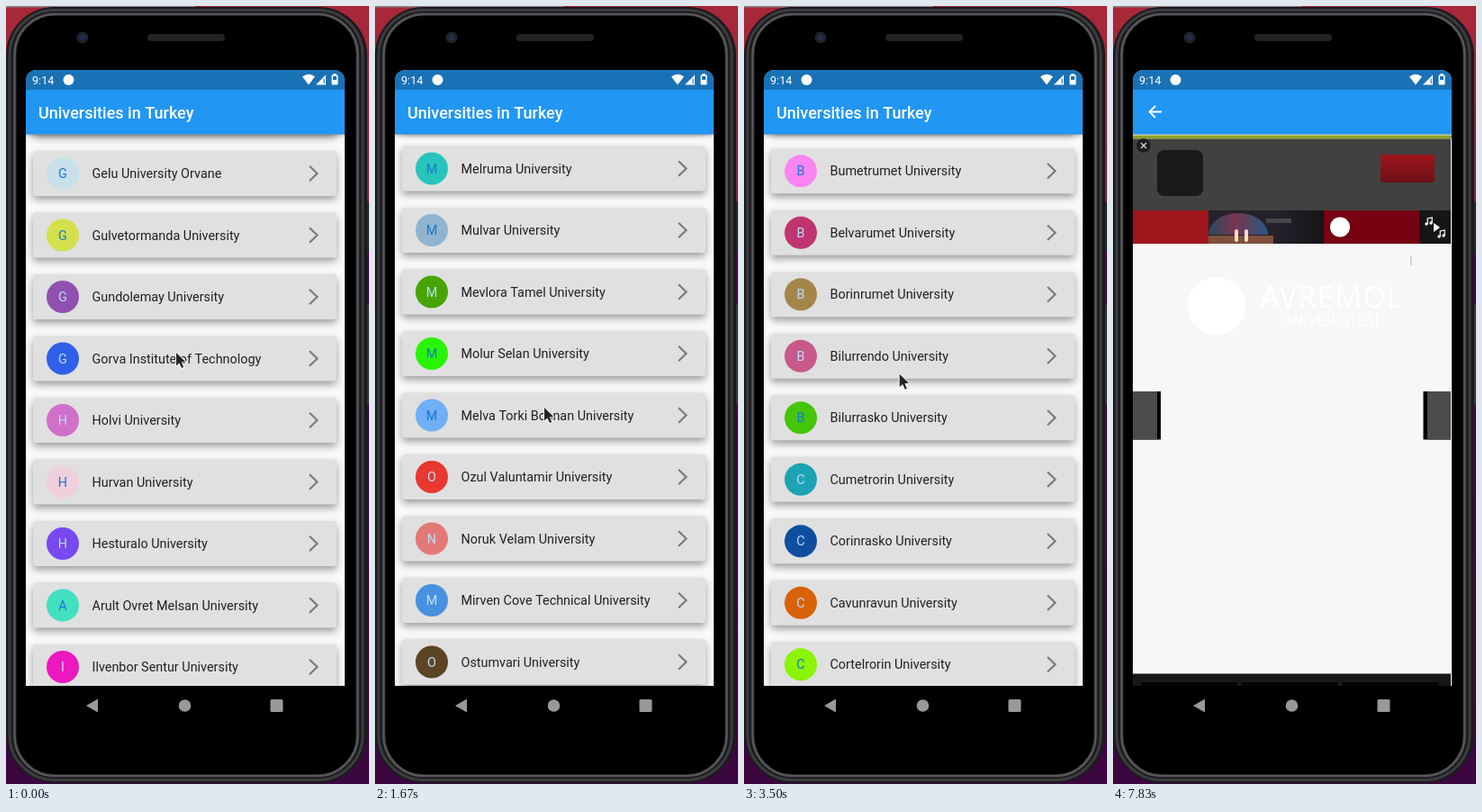
Write an HTML page with a canvas that moves like this. It is 403 px wide and 864 px high and loops after 8 s.

```html
<!DOCTYPE html>
<html lang="en">
<head>
<meta charset="utf-8">
<title>University list</title>
<style>
  html, body { margin: 0; width: 100%; height: 100%; overflow: hidden; background: #000; }
  canvas { display: block; }
</style>
</head>
<body>
<canvas id="stage" width="403" height="864"></canvas>
<script>
const ctx = document.getElementById('stage').getContext('2d');
const LOOP = 8000, PITCH = 68.5, FIRST_Y = 177;
const SANS = 'Roboto, sans-serif';
const SCREEN = { x: 22, y: 71, w: 354, h: 684 };

const rand = n => { const v = Math.sin(n * 12.9898 + 4.1) * 43758.5453; return v - Math.floor(v); };
const clamp = v => Math.max(0, Math.min(1, v));

// Each row: name | avatar colour | avatar colour once the row has been rebuilt
const parse = text => text.trim().split('\n').map(row => row.trim().split('|'));

const SYLLABLES = ['elva', 'orin', 'umet', 'asko', 'ilur', 'endo', 'avun', 'ortel'];
const filler = (initials, seed) => [...initials].map((letter, i) => {
  const pick = k => SYLLABLES[Math.floor(rand(seed + i * 3 + k) * SYLLABLES.length)];
  return [letter + pick(1) + 'r' + pick(2) + ' University'];
});

const rows = [
  ...parse(`
    Arvon Tundelas University||60f4ac
    Alu Ovrem University||80b040
    Alvoruz University||c8e4f0
    Astul Venorape University||f04828
    Avremol University||38c0a0
    Artuva University||4830cc
    Ilvenbor Utel University||f0fcb8
    Asvünt University||c08820
    Arlivo University||68f474`),
  ...filler('BBBBBBBCCCCCDDDDEEFF', 10),
  ...parse(`
    Gelu University Orvane|c8e0ea
    Gulvetormanda University|d4e04c
    Gundolemay University|9050b0
    Gorva Institute of Technology|3060e8
    Holvi University|d070c8
    Hurvan University|f0d0dc
    Hesturalo University|7848f0
    Arult Ovret Melsan University|40e0c0
    Ilvenbor Sentur University|ec18c0`),
  ...filler('II', 90),
  ...parse(`
    Ilvenbor Pelira University|004468
    Ilvenbor Technical University|b01c00
    Irlov Institute of Technology|e840f0
    Irlov Economic University|4888d8
    Kolvus University|001400
    Zervundal Tovelmir University|c02c00
    Kovel Tas University|70789c
    Kurel 5 Ormalı University|e81898
    Kovulmer University|b88c7c
    Nolvettur Ormasan University||706858
    Kuvelin University||e0e4b0
    Kelvoramentas Büldü Orem/University||18284c
    Kolumeniv Technical University||bc5884
    Köv University||10b444
    Molvuna University||dc1c74
    Melruma University|28c4bc|38c090
    Mulvar University|90b4d0|90901c
    Mevlora Tamel University|48a400|f44820
    Molur Selan University|28f400
    Melva Torki Bosnan University|70b0f8
    Ozul Valuntamir University|e83830
    Noruk Velam University|e47878
    Mirven Cove Technical University|4890e0
    Ostumvari University|5c4424`),
  ...filler('PSSSSTTTUUYY', 140)
];
const LAST_REBUILT = 57, TURN = 2200;

// Keyframes: time, value...
const SCROLL = [[0, 1977.5], [830, 2728], [1250, 3080], [1670, 3764], [TURN, 4255],
  [2500, 4010], [2830, 3386.5], [3250, 1950], [3750, 0], [LOOP, 0]];
const CURSOR = [[0, 189, 385], [900, 189, 385], [1250, 190, 490], [1670, 188, 446],
  [1950, 188, 400], [2250, 187, 400], [2830, 175, 677], [3250, 174, 560], [3900, 171, 207],
  [4640, 171, 207], [4970, 150, 458], [6700, 150, 458], [7530, 31, 440], [7650, -20, 436], [LOOP, -20, 436]];
const GLOW = [[0, 0], [3700, 0], [3820, 48], [4130, 8], [4360, 8], [4370, 0], [LOOP, 0]];

// Monotone cubic interpolation
function track(keys, t, col = 1) {
  const k = Math.max(0, keys.findIndex(key => key[0] > t) - 1);
  const slope = i => i < 0 || i > keys.length - 2 ? 0
    : (keys[i + 1][col] - keys[i][col]) / (keys[i + 1][0] - keys[i][0]);
  const tangent = i => {
    const a = slope(i - 1), b = slope(i);
    if (i === 0) return b;
    return a * b <= 0 ? 0 : 2 * a * b / (a + b);
  };
  const span = keys[k + 1][0] - keys[k][0], u = (t - keys[k][0]) / span;
  const from = keys[k][col], to = keys[k + 1][col];
  return from + (to - from) * u * u * (3 - 2 * u)
    + span * u * (1 - u) * ((1 - u) * tangent(k) - u * tangent(k + 1));
}

function rect(x, y, w, h, fill, radius = 0) {
  ctx.fillStyle = fill;
  ctx.beginPath();
  ctx.roundRect(x, y, w, h, radius);
  ctx.fill();
}
function outline(x, y, w, h, radius, color, width) {
  ctx.strokeStyle = color;
  ctx.lineWidth = width;
  ctx.beginPath();
  ctx.roundRect(x, y, w, h, radius);
  ctx.stroke();
}
function circle(x, y, r, fill) {
  ctx.fillStyle = fill;
  ctx.beginPath();
  ctx.arc(x, y, r, 0, Math.PI * 2);
  ctx.fill();
}
function poly(points, fill, stroke, width) {
  ctx.beginPath();
  points.forEach(([x, y]) => ctx.lineTo(x, y));
  if (fill) { ctx.closePath(); ctx.fillStyle = fill; ctx.fill(); }
  if (stroke) { ctx.strokeStyle = stroke; ctx.lineWidth = width; ctx.stroke(); }
}
function text(str, x, y, font, fill, align = 'left') {
  ctx.font = font;
  ctx.fillStyle = fill;
  ctx.textAlign = align;
  ctx.fillText(str, x, y);
}
function gradient(x0, y0, x1, y1, ...stops) {
  const g = ctx.createLinearGradient(x0, y0, x1, y1);
  stops.forEach(([at, color]) => g.addColorStop(at, color));
  return g;
}
function clipped(x, y, w, h, radius, draw) {
  ctx.save();
  ctx.beginPath();
  ctx.roundRect(x, y, w, h, radius);
  ctx.clip();
  draw();
  ctx.restore();
}
function shadow(color, blur, dy) {
  ctx.shadowColor = color;
  ctx.shadowBlur = blur;
  ctx.shadowOffsetY = dy;
}

function avatarColor(i, rebuilt) {
  const hex = rows[i][rebuilt ? 2 : 1];
  return [0, 1, 2].map(c => hex ? parseInt(hex.substr(c * 2, 2), 16)
    : Math.floor(256 * rand(i * 7 + c * 31 + (rebuilt ? 500 : 0))));
}
function isLight(rgb) {
  const [r, g, b] = rgb.map(v => ((v / 255 + 0.055) / 1.055) ** 2.4);
  return (0.2126 * r + 0.7152 * g + 0.0722 * b + 0.05) ** 2 > 0.15;
}

function drawPhone() {
  rect(0, 0, 403, 864, gradient(0, 0, 0, 864, [0, '#a82838'], [0.25, '#90243e'],
    [0.32, '#4c0650'], [1, '#3c0640']));
  rect(0, 0, 210, 1.5, '#8e8088');
  rect(399, 217, 4, 56, '#29292b', 1);
  rect(399, 331, 4, 112, '#3a393b', 1);
  rect(0, 1, 401, 862, '#1b1b1e', 54);
  outline(4, 4.5, 392, 855, 50, '#3c3c40', 3);
  outline(9.5, 9, 381, 846, 45, '#57575b', 2.5);
  rect(12, 11, 376, 842, '#000', 42);
  circle(85, 35, 6.5, '#20222b');
  circle(85, 35, 3.5, '#252b48');
  rect(157, 31, 86, 8, '#232325', 4);
  poly([[89, 777], [102, 769.5], [102, 784.5]], '#999');
  circle(198.5, 777, 6.8, '#999');
  rect(293.5, 770, 14, 14, '#999', 1.5);
}

function drawAppBar() {
  ctx.save();
  shadow('rgba(0,0,0,.3)', 4, 1);
  rect(22, 71, 354, 71.5, '#2196f3');
  ctx.restore();
}

function drawStatus() {
  rect(22, 71, 354, 22, 'rgba(0,0,0,.25)');
  text('9:14', 29, 86.5, '12.6px ' + SANS, '#fff');
  circle(69.5, 82, 6, '#fff');
  ctx.beginPath();
  ctx.moveTo(336, 87.5);
  ctx.lineTo(329, 78.5);
  ctx.quadraticCurveTo(336, 73, 343, 78.5);
  ctx.fill();
  poly([[344, 87.5], [355, 87.5], [355, 76.5]], '#fff');
  rect(352.5, 81, 1.2, 5, '#1971b6');
  rect(363.5, 75, 3, 2, '#fff');
  rect(361.5, 76.5, 7, 11, '#fff', 1);
  rect(363, 78, 4, 4, '#1971b6');
}

function drawRow(i, y, rebuilt) {
  const [name] = rows[i], color = avatarColor(i, rebuilt);
  ctx.save();
  shadow('rgba(0,0,0,.38)', 9, 4);
  rect(30, y - 25, 337, 50, '#e0e0e0', 3);
  ctx.restore();
  circle(63, y, 18, `rgb(${color})`);
  text(name[0], 63, y + 5, '14.4px ' + SANS, isLight(color) ? '#1976d2' : '#bbdefb', 'center');
  const lines = name.split('/');
  lines.forEach((line, n) =>
    text(line, 95.5, y + 5 + (n - (lines.length - 1) / 2) * 17, '14.4px ' + SANS, '#212121'));
  poly([[337, y - 8.3], [345.5, y], [337, y + 8.3]], null, '#7b7b7b', 2.2);
}

function drawList(t) {
  rect(22, 71, 354, 684, '#fafafa');
  const scroll = track(SCROLL, t);
  rows.forEach((row, i) => {
    const y = FIRST_Y + i * PITCH - scroll;
    if (y > 100 && y < 790) drawRow(i, y, t > TURN && i <= LAST_REBUILT);
  });
  const depth = track(GLOW, t);
  if (depth > 0) {
    ctx.fillStyle = `rgba(33,150,243,${0.08 + depth / 480})`;
    ctx.beginPath();
    ctx.ellipse(199, 143, 177, depth, 0, 0, Math.PI);
    ctx.fill();
  }
  drawAppBar();
  text('Universities in Turkey', 36, 124.5, '500 18px ' + SANS, '#fff');
}

function drawNote(x, y) {
  circle(x, y + 6, 1.7, '#fff');
  circle(x + 5, y + 5, 1.7, '#fff');
  poly([[x + 1.2, y + 6], [x + 1.2, y], [x + 6.2, y - 1], [x + 6.2, y + 5]], null, '#fff', 1.2);
}

function drawWebsite() {
  rect(22, 143, 354, 612, '#f7f7f7');
  rect(22, 143.5, 354, 4, '#8ca322');
  rect(22, 147.5, 353, 79.5, '#414141');
  circle(34, 155, 7.8, '#1d1d1d');
  poly([[31, 152], [37, 158]], null, '#ddd', 1.2);
  poly([[37, 152], [31, 158]], null, '#ddd', 1.2);
  rect(49, 160, 51, 51, '#191919', 8);
  rect(297, 165, 60, 31, gradient(0, 165, 0, 196, [0, '#a0141c'], [1, '#6c1018']), 3);

  rect(22, 227, 84, 37, '#a0151c');
  clipped(106, 227, 128, 37, 0, () => {
    rect(106, 227, 128, 37, gradient(106, 0, 234, 0, [0, '#24232b'], [0.6, '#24212a'], [1, '#141416']));
    ctx.fillStyle = gradient(108, 0, 168, 0, [0, '#294a5c'], [0.45, '#7b3550'], [1, '#31547d']);
    ctx.beginPath();
    ctx.ellipse(139, 254, 33, 24, 0, Math.PI, 0);
    ctx.fill();
    rect(106, 255, 72, 9, '#80513c');
    rect(135, 248, 4, 14, '#f6dfc0', 2);
    rect(146, 248, 4, 14, '#f6dfc0', 2);
    rect(170, 236, 28, 5, '#43484a');
  });
  rect(234, 227, 106, 37, '#760212');
  circle(252, 245.5, 11, '#fff');
  rect(340, 227, 35, 37, '#161616');
  drawNote(348, 236);
  drawNote(362, 250);
  poly([[356, 241], [356, 251], [363, 246]], '#fff');

  circle(115, 333, 32, '#fff');
  ctx.letterSpacing = '1px';
  text('AVREMOL', 243, 335, '33px "Noto Sans", sans-serif', '#fff', 'center');
  ctx.letterSpacing = '0px';
  text('ÜNİVERSİTESİ', 241, 355, '17px "Noto Sans", sans-serif', '#fff', 'center');
  rect(330, 277, 1.5, 11, '#ccc');

  rect(22, 428, 31, 53.5, '#000');
  rect(22, 428, 27, 53.5, '#4b4b4b');
  rect(344.5, 428, 31, 53.5, '#000');
  rect(349, 428, 26.5, 53.5, '#4b4b4b');
  rect(22, 741.5, 354, 13.5, '#181818');
  [31, 142.5, 254.5].forEach(x => rect(x, 751, 107.5, 4, '#050505'));
  rect(375, 147.5, 1, 607.5, '#fff');
}

function drawDetail(t) {
  rect(22, 71, 354, 684, t < 6530 ? '#fff' : '#f7f7f7');
  drawAppBar();
  if (t >= 7700) drawWebsite();
  poly([[54, 117.5], [41, 117.5]], null, '#fff', 1.8);
  poly([[47, 111], [40.5, 117.5], [47, 124]], null, '#fff', 1.8);
}

function drawCursor(x, y) {
  ctx.save();
  ctx.translate(x, y);
  ctx.lineJoin = 'round';
  const arrow = [[0, 0], [0, 14.5], [3.4, 11.4], [6, 17], [8.2, 16], [5.7, 10.6], [10.3, 10.2]];
  poly([...arrow, arrow[0]], null, 'rgba(255,255,255,.85)', 2);
  poly(arrow, '#242424');
  ctx.restore();
}

function draw(t) {
  drawPhone();
  clipped(SCREEN.x, SCREEN.y, SCREEN.w, SCREEN.h, [12, 12, 0, 0], () => {
    const open = clamp((t - 5400) / 350);
    if (open < 1) drawList(t);
    if (open > 0) {
      ctx.save();
      ctx.globalAlpha = open ** 1.7;
      ctx.translate(0, SCREEN.h * 0.25 * (1 - open) ** 3);
      drawDetail(t);
      ctx.restore();
    }
    drawStatus();
  });
  drawCursor(track(CURSOR, t, 1), track(CURSOR, t, 2));
}

// The picture advances 30 times a second, on whole hundredths of a second
const snap = t => Math.round(Math.floor((t + 4) * 0.03) / 0.3) * 10;

const start = performance.now();
function frame() {
  draw(snap((performance.now() - start) % LOOP) % LOOP);
  requestAnimationFrame(frame);
}
frame();
</script>
</body>
</html>
```
